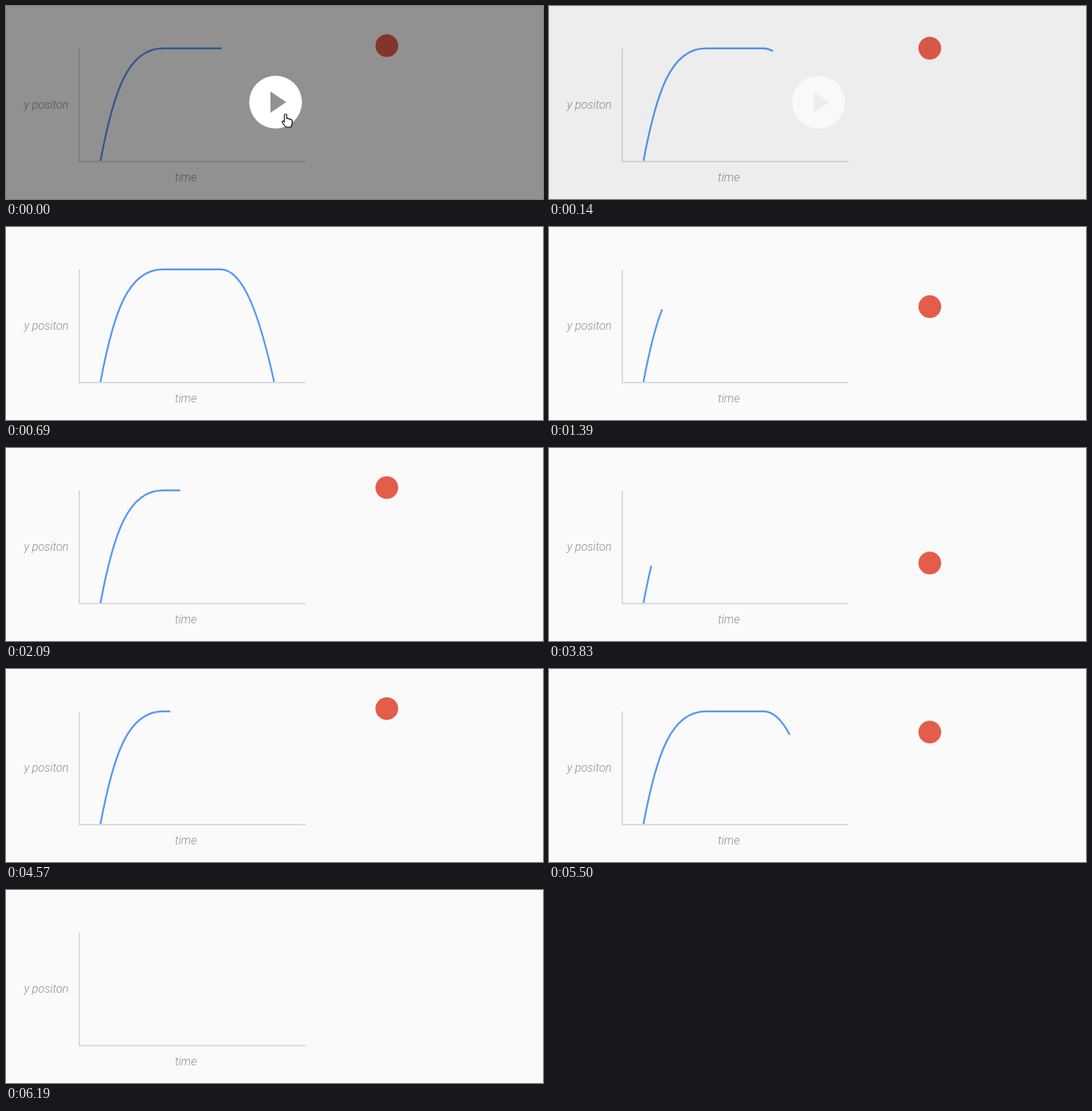
An HTML page that plays this animation: 733x263 px, repeating every 6460 ms.

```html
<!DOCTYPE html>
<html lang="en">
<head>
<meta charset="utf-8">
<title>Position over time</title>
<style>
  html, body { margin: 0; width: 100%; height: 100%; overflow: hidden; background: #fafafa; }
  svg { display: block; width: 733px; height: 263px; }
  text { font: italic 300 15.75px Roboto, sans-serif; fill: #909090; }
</style>
</head>
<body>
<svg viewBox="0 0 733 263">
  <clipPath id="aboveAxis"><rect width="733" height="212.5"/></clipPath>
  <path d="M100 58V212H409" fill="none" stroke="#d1d1d1" stroke-width="1.5"/>
  <text x="24.5" y="139.5">y positon</text>
  <text x="230.5" y="239">time</text>
  <path id="curve" d="M129 211C147 115 167 57.7 214 57.7H293C325 57.7 347 125 366 211"
        fill="none" stroke="#5797f2" stroke-width="2.4"/>
  <g clip-path="url(#aboveAxis)"><circle id="ball" cx="519.8" r="15.5" fill="#e45c4a"/></g>
  <rect id="shade" width="733" height="263"/>
  <path id="play" fill="#fff" fill-rule="evenodd"
        d="M332 131a36 36 0 1 0 72 0a36 36 0 1 0 -72 0M361 116.5V145.5L382.5 131Z"/>
  <path id="hand" fill="#fff" stroke="#000" stroke-width="1.2" stroke-linejoin="round"
        d="M380 158V149q0-2 1.600-2t1.600 2v4.500q2.400-1 3 .6q2-.6 2.500.8q2-.3 2 1.600v3.500l-1.600 5h-7.200l-4.600-6q-.8-2 .9-2.200Z"/>
</svg>
<script>
const LOOP = 6460, STEP = 30, STEP_OFFSET = 10;
const START_X = 129, END_X = 366;
const EXIT = 3;            // how far past END_X the ball keeps falling
const EXIT_SLOPE = 4.5;    // fall per pixel of x, as at the curve's end
const LINGER = 50;         // ms the ball stays after its run
const SHOW_RESULT = 280;   // ms the finished curve stays after the ball has gone

// The first run is already under way when the loop begins.
const runs = [
  { start: -1290, end: 640 },
  { start: 1180, end: 3165 },
  { start: 3725, end: 5860 }
];

const [curve, ball, shade, play, hand] =
  ['curve', 'ball', 'shade', 'play', 'hand'].map(id => document.getElementById(id));
const total = curve.getTotalLength();

const show = (element, visible) => { element.style.display = visible ? '' : 'none'; };

// The curve runs left to right, so its length at a given x can be bisected.
function lengthAt(x) {
  let low = 0, high = total;
  for (let i = 0; i < 18; i++) {
    const mid = (low + high) / 2;
    if (curve.getPointAtLength(mid).x < x) low = mid; else high = mid;
  }
  return low;
}

function drawRun(t) {
  const stepped = Math.floor((t - STEP_OFFSET) / STEP) * STEP + STEP_OFFSET;
  const run = runs.find(r => stepped > r.start && t < r.end + LINGER + SHOW_RESULT);
  show(curve, run);
  show(ball, run && t < run.end + LINGER);
  if (!run) return;
  const progress = Math.min(1, (stepped - run.start) / (run.end - run.start));
  const x = START_X + (END_X + EXIT - START_X) * progress;
  const length = lengthAt(x);
  curve.setAttribute('stroke-dasharray', `${length} ${total + 10}`);
  const overshoot = Math.max(0, x - END_X) * EXIT_SLOPE;
  ball.setAttribute('cy', curve.getPointAtLength(length).y - 3.8 + overshoot);
}

function drawOverlay(t) {
  const paused = t < STEP;
  const fade = paused ? 0 : t;
  shade.setAttribute('opacity', 0.424 * Math.max(0, 1 - fade / 160));
  play.setAttribute('opacity', Math.max(0, 1 - fade / 440));
  show(hand, paused);
}

const began = performance.now();
function frame() {
  const t = (performance.now() - began) % LOOP;
  drawRun(Math.max(t, STEP + STEP_OFFSET));   // paused during the first step
  drawOverlay(t);
  requestAnimationFrame(frame);
}
frame();
</script>
</body>
</html>
```
